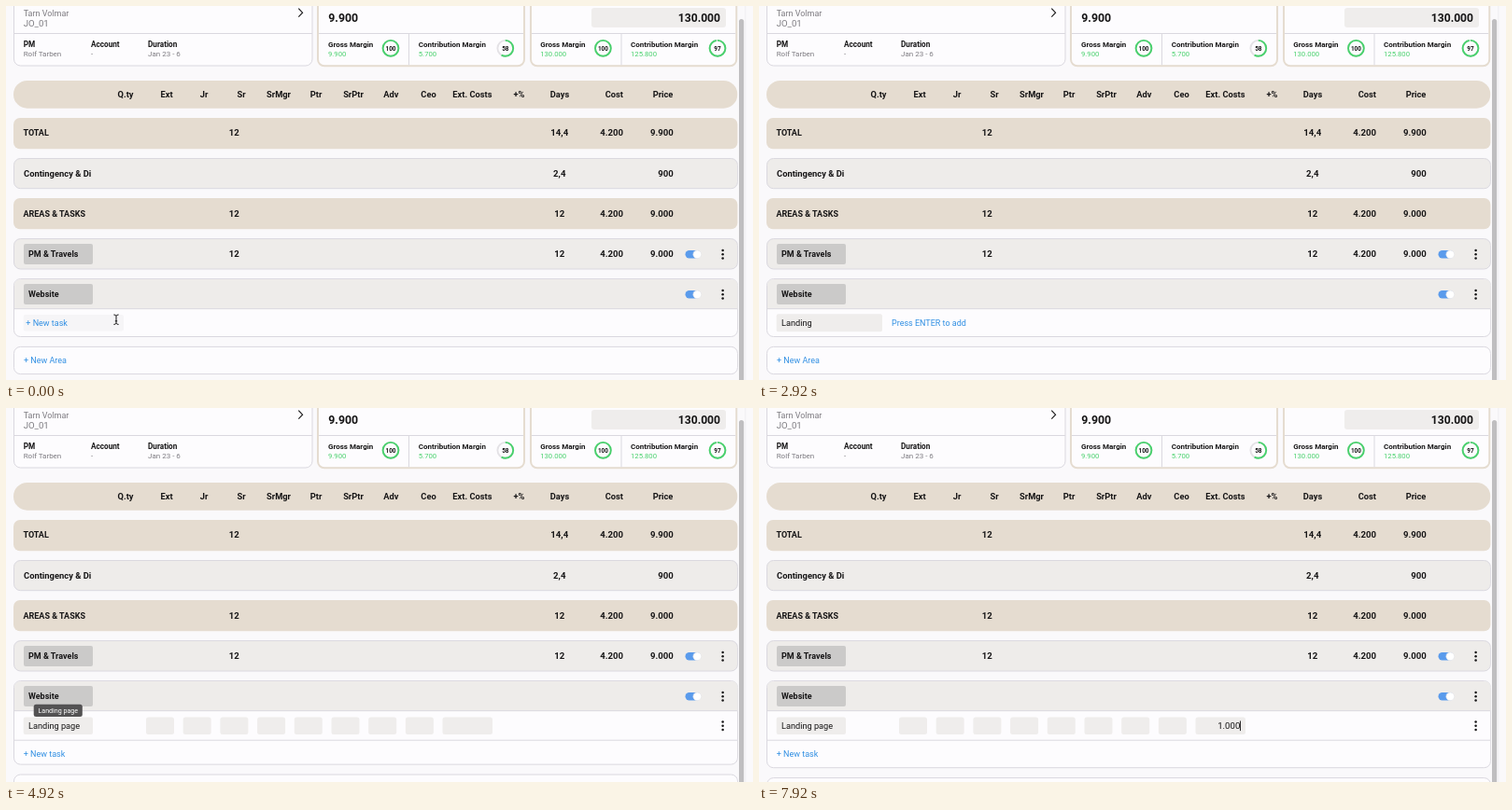
These frames come from a looping animation (800x401 px, 8000 ms). An HTML page:

```html
<!DOCTYPE html>
<html lang="en">
<head>
<meta charset="utf-8">
<title>Budget table</title>
<style>
html, body { margin: 0; width: 100%; height: 100%; overflow: hidden; background: #faf9fb; }
svg { display: block; width: 800px; height: 401px; font-family: Roboto, Inter, sans-serif; }
</style>
</head>
<body>
<svg id="stage" viewBox="0 0 800 401" xmlns="http://www.w3.org/2000/svg"></svg>
<script>
const LOOP = 8000;
const INK = '#161516', GREY = '#7d7b80', BLUE = '#3290e3', GREEN = '#48d16c';
const BEIGE = '#e5dcd0', PANEL = '#eeecea', FIELD = '#efedec', CHIP = '#cbcac9';
const EDGE = '#dad8df', WHITE = '#fdfcfe';
const stage = document.getElementById('stage');

function add(tag, attrs, parent = stage) {
  const el = document.createElementNS(stage.namespaceURI, tag);
  for (const k in attrs) el.setAttribute(k, attrs[k]);
  parent.appendChild(el);
  return el;
}
const group = (parent = stage) => add('g', {}, parent);
const box = (x, y, x2, y2, fill, rx = 2, stroke = 'none', parent = stage) =>
  add('rect', { x, y, width: x2 - x, height: y2 - y, rx, fill, stroke }, parent);
const path = (d, stroke = EDGE, width = 1, parent = stage) =>
  add('path', { d, stroke, 'stroke-width': width, fill: 'none' }, parent);

function text(str, x, y, o = {}, parent = stage) {
  const el = add('text', {
    x, y, 'font-size': o.size || 9, 'font-weight': o.bold ? 600 : 400,
    fill: o.fill || INK, 'text-anchor': o.anchor || 'start'
  }, parent);
  el.textContent = str;
  return el;
}
const show = (el, on) => el.setAttribute('visibility', on ? 'visible' : 'hidden');

function ring(cx, cy, pct) {
  const r = 8.4, len = 2 * Math.PI * r;
  const base = { cx, cy, r, fill: 'none', 'stroke-width': 1.9 };
  add('circle', { ...base, stroke: '#e4e2e6' });
  add('circle', {
    ...base, stroke: GREEN, transform: `rotate(-90 ${cx} ${cy})`,
    'stroke-dasharray': `${len * pct / 100} ${len}`
  });
  text(pct, cx, cy + 2.3, { size: 6.4, bold: true, anchor: 'middle' });
}

function margin(label, value, x, ringX, pct) {
  text(label, x, 43.5, { size: 8, bold: true });
  text(value, x, 54, { size: 7.7, fill: GREEN });
  ring(ringX, 45.3, pct);
}

function kebab(y, parent = stage) {
  for (const dy of [-4.2, 0, 4.2])
    add('circle', { cx: 767.6, cy: y + dy, r: 1.25, fill: INK }, parent);
}

function area(name, y) {
  box(19, y - 11, 93, y + 11, CHIP);
  text(name, 24, y + 3, { bold: true });
  box(727.5, y - 4, 744, y + 4.5, '#5a9bec', 4.2);
  add('circle', { cx: 740.3, cy: y + 0.3, r: 4.4, fill: '#fff', stroke: '#e3e2e6', 'stroke-width': 0.6 });
  kebab(y + 0.2);
}

function figures(y, sr, days, cost, price) {
  const o = { size: 9.6, bold: true };
  text(sr, 244.3, y, { ...o, anchor: 'middle' });
  text(days, 592.8, y, { ...o, anchor: 'middle' });
  text(cost, 661, y, { ...o, anchor: 'end' });
  text(price, 714.7, y, { ...o, anchor: 'end' });
}

// Summary cards
box(8.5, -20, 328, 64, WHITE, 7, EDGE);
path('M8.5 29.5H328');
text('g', 113, -1.6, { size: 10, bold: true });
text('Tarn Volmar', 18.7, 10.7, { fill: GREY });
text('JO_01', 18.7, 22, { size: 9.6, fill: GREY });
path('M313.3 2.7L317.6 7.2L313.3 11.7', INK, 1.1);
[['PM', 'Rolf Tarben', 18.7], ['Account', '-', 91], ['Duration', 'Jan 23 - 6', 152]].forEach(([k, v, x]) => {
  text(k, x, 43.5, { size: 8.2, bold: true });
  text(v, x, 54, { size: 8, fill: GREY });
});
[[334, 555, 431.5], [562, 782.3, 659]].forEach(([a, b, mid]) => {
  box(a, -20, b, 64.3, WHITE, 7, BEIGE).setAttribute('stroke-width', 2);
  path(`M${a + 1} 29.5H${b - 1}M${mid} 29.5V63.3`);
});
text('9.900', 345.3, 16.6, { size: 12.3, bold: true });
box(627, 2, 771, 23, FIELD, 3);
text('130.000', 765, 16.6, { size: 12.1, bold: true, anchor: 'end' });
margin('Gross Margin', '9.900', 345, 412, 100);
margin('Contribution Margin', '5.700', 441.8, 534.8, 58);
margin('Gross Margin', '130.000', 572.2, 639.4, 100);
margin('Contribution Margin', '125.800', 669, 762, 97);

// Table
box(8, 80, 783.3, 109.7, BEIGE, 14.8);
const heads = ['Q.ty', 'Ext', 'Jr', 'Sr', 'SrMgr', 'Ptr', 'SrPtr', 'Adv', 'Ceo', 'Ext. Costs', '+%', 'Days', 'Cost', 'Price'];
const headX = [128, 172, 212, 252, 292, 332, 372, 412.3, 452.5, 499.4, 549.5, 593, 651.3, 703.5];
heads.forEach((h, i) => text(h, headX[i], 97.6, { size: 9.3, bold: true, anchor: 'middle' }));

box(8, 120, 783.5, 153.2, BEIGE, 7);
text('TOTAL', 18.5, 139.2, { bold: true });
figures(139.2, '12', '14,4', '4.200', '9.900');
box(8.5, 163.5, 783.5, 195.7, PANEL, 7, EDGE);
text('Contingency & Di', 19, 182.7, { size: 9.4, bold: true });
figures(182.9, '', '2,4', '', '900');
box(8, 206, 783.5, 239.3, BEIGE, 7);
text('AREAS & TASKS', 18.5, 225.7, { bold: true });
figures(225.7, '12', '12', '4.200', '9.000');
box(8.5, 249.6, 783.5, 282, PANEL, 7, EDGE);
area('PM & Travels', 266);
figures(269.3, '12', '12', '4.200', '9.000');

// Website area, grows when the task is added
const card = box(8.5, 292.6, 783.5, 354.5, WHITE, 7, EDGE);
add('path', { d: 'M9 324.7V300Q9 293.1 16 293.1H776Q783.5 293.1 783.5 300V324.7Z', fill: PANEL });
path('M8.5 324.7H783.5');
area('Website', 309);

const hover = group();
box(18.7, 331, 126, 348.5, '#f6f5f7', 2, 'none', hover);
text('+ New task', 21.3, 342.7, { fill: BLUE }, hover);

const entry = group();
box(18.7, 330.3, 132, 349.3, FIELD, 2, 'none', entry);
const nameText = text('', 24, 342.8, { size: 9.2 }, entry);
text('Press ENTER to add', 142, 342.8, { fill: BLUE }, entry);

const saving = text('Saving...', 18.7, 341.6, { fill: BLUE });

const clip = add('clipPath', { id: 'grow' });
const clipBox = box(0, 320, 800, 354, '#000', 0, 'none', clip);
const task = add('g', { 'clip-path': 'url(#grow)' });
box(18.7, 331.6, 93, 350, FIELD, 2, 'none', task);
text('Landing page', 24, 343.6, { size: 9.2 }, task);
for (let i = 0; i < 8; i++) box(150 + i * 39.7, 331.6, 180 + i * 39.7, 350, FIELD, 2.5, 'none', task);
box(467.5, 331.6, 521, 350, FIELD, 2.5, 'none', task);
const costText = text('', 515.3, 343.8, { size: 9.6, anchor: 'end' }, task);
kebab(340.8, task);
path('M8.5 356.2H783.5', EDGE, 1, task);
text('+ New task', 18.7, 373.8, { fill: BLUE }, task);

const tip = group();
box(29.7, 317.8, 81.8, 331, '#535253', 2.5, 'none', tip);
text('Landing page', 55.8, 326.8, { size: 7.1, fill: '#fff', anchor: 'middle' }, tip);

const newArea = group();
box(8.5, 365.4, 783.5, 394.6, WHITE, 7, EDGE, newArea);
text('+ New Area', 18.9, 383.2, { fill: BLUE }, newArea);

// Scrollbar
box(783.8, 0, 792, 401, '#faf9fb', 0);
path('M791.8 0V401', '#ececef', 0.8);
const thumb = box(785, 14, 790.2, 420, '#bfbec0', 2.6);

const caret = path('M0 0V10.6', INK, 0.9);
const beam = path('M-2.6 -5.2Q-.4 -5.2 0 -4Q.4 -5.2 2.6 -5.2M0 -4.2V4.2M-2.6 5.2Q-.4 5.2 0 4Q.4 5.2 2.6 5.2M-1.2 1.6H1.2', INK, 1);

// Timeline in ms
const OPEN = 500, ENTER = 3830, SAVED = 4670, GROWN = 5000, FOCUS = 6170;
const nameKeys = [1170, 1400, 1750, 1920, 2080, 2250, 2420, 3000, 3170, 3330, 3500, 3580];
const costKeys = [6920, 7080, 7250, 7500];
const costSteps = ['', '1', '10', '100', '1.000'];

const clamp = v => Math.max(0, Math.min(1, v));
const ease = p => p < 0.5 ? 2 * p * p : 1 - 2 * (1 - p) ** 2;
const span = (t, a, b) => clamp((t - a) / (b - a));

function typed(keys, t, start) {
  const n = keys.filter(k => k <= t).length;
  const last = n ? keys[n - 1] : start;
  return { n, lit: (t - last) % 1000 < 500 };
}

function draw(t) {
  const editing = t >= OPEN && t < ENTER, saved = t >= SAVED;
  show(hover, t < OPEN);
  show(entry, editing);
  show(saving, t >= ENTER && !saved);
  show(task, saved);

  const name = typed(nameKeys, t, OPEN);
  nameText.textContent = 'Landing page'.slice(0, name.n);
  const cost = typed(costKeys, t, FOCUS);
  costText.textContent = costSteps[cost.n];

  const grow = 31.2 * ease(span(t, SAVED, GROWN));
  card.setAttribute('height', 61.9 + grow);
  clipBox.setAttribute('height', 34 + grow);
  newArea.setAttribute('transform', `translate(0 ${grow})`);
  thumb.setAttribute('y', 14 - grow / 31.2);
  tip.setAttribute('opacity', span(t, 4750, 4900) * (1 - span(t, 5080, 5240)));

  const focused = t >= FOCUS;
  show(caret, editing ? name.lit : focused && cost.lit);
  const caretX = editing ? 24.5 + (name.n ? nameText.getComputedTextLength() : 0) : 515.5;
  caret.setAttribute('transform', `translate(${caretX} ${editing ? 334.4 : 335.5})`);

  const move = ease(span(t, 5330, 5850));
  show(beam, t < nameKeys[0] || (t >= 5330 && t < costKeys[0]));
  beam.setAttribute('transform', `translate(${118 + 375 * move} ${336.2 + 3 * move})`);
}

function tick() {
  draw(performance.now() % LOOP);
  requestAnimationFrame(tick);
}
tick();
</script>
</body>
</html>
```
